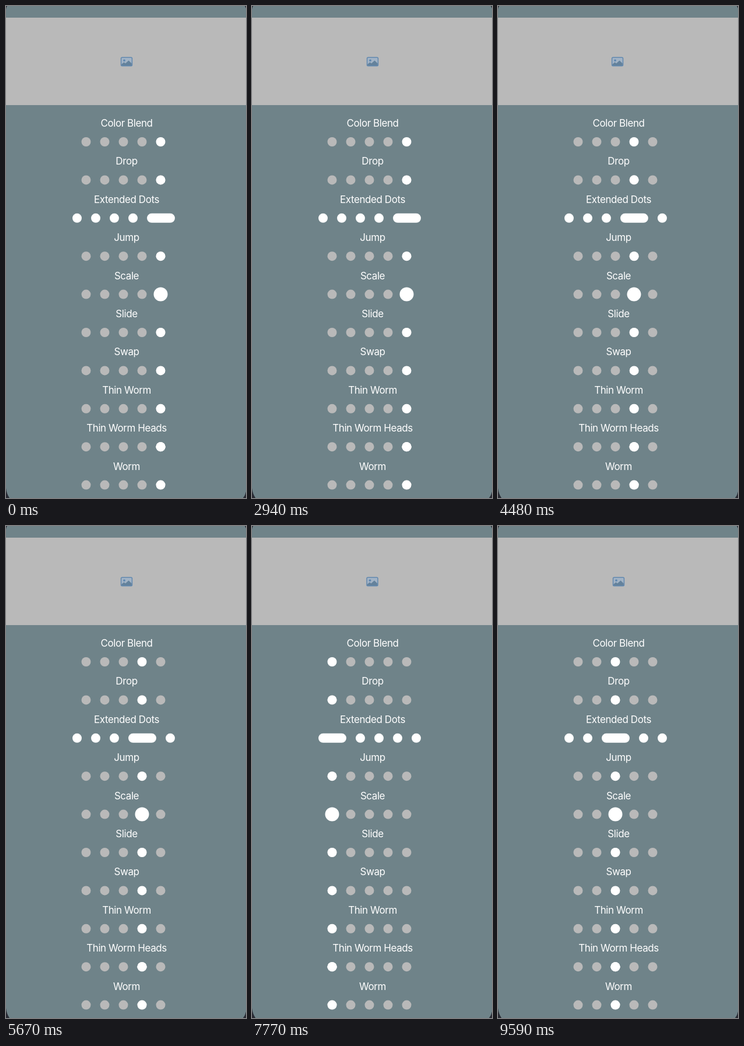
An HTML page with a canvas that plays this animation: 412x844 px, repeating every 9.66 s.

```html
<!DOCTYPE html>
<html lang="en">
<head>
<meta charset="utf-8">
<title>Page indicators</title>
<style>
html, body { margin: 0; width: 100%; height: 100%; overflow: hidden; background: #6f8389; }
canvas { display: block; }
</style>
</head>
<body>
<canvas id="stage" width="412" height="844"></canvas>
<script>
const ctx = document.getElementById('stage').getContext('2d');
const W = 412, H = 844, LOOP = 9660, STEP = 70, SWIPE = 500;
const BG = '#6f8389', GREY = '#b9b9b9', WHITE = '#fff', DARK = '#292b34';
const R = 8, GAP = 32, X0 = 137.5, Y0 = 233, ROW = 65.4;

// Swipes as [start time, direction], beginning on the last page
const swipes = [[4000, -1], [5760, -1], [6656, -1], [7220, -1], [7760, 1], [8304, 1]];

function pageAt(t) {
  return swipes.reduce((p, [start, dir]) => {
    const s = Math.min(1, Math.max(0, (t - start) / SWIPE));
    return p + dir * s * s * (3 - 2 * s);
  }, 4);
}

const dotX = i => X0 + GAP * i;
const near = (i, p) => Math.max(0, 1 - Math.abs(i - p));
const blend = k => {
  const v = Math.round(185 + 70 * k);
  return `rgb(${v},${v},${v})`;
};

function circle(x, y, r = R, color = WHITE) {
  ctx.fillStyle = color;
  ctx.beginPath();
  ctx.arc(x, y, r, 0, 7);
  ctx.fill();
}

function box(x, y, w, h, r, color = WHITE) {
  ctx.fillStyle = color;
  ctx.beginPath();
  ctx.roundRect(x, y, w, h, r);
  ctx.fill();
}

function shape(path, color) {
  ctx.fillStyle = color;
  ctx.fill(new Path2D(path));
}

function greyDots(y) {
  for (let i = 0; i < 5; i++) circle(dotX(i), y, R, GREY);
}

// Head and tail centres of a worm that stretches, then contracts
function wormEnds(p) {
  const i = Math.floor(p), f = p - i;
  return [dotX(i + Math.max(0, 2 * f - 1)), dotX(i + Math.min(1, 2 * f))];
}

function worm(p, y, h) {
  const [a, b] = wormEnds(p);
  box(a - R, y - h / 2, b - a + 2 * R, h, h / 2);
}

// Each drawer takes page p, row centre y and u, the distance to the nearest page
const rows = [
  ['Color Blend', (p, y) => {
    for (let i = 0; i < 5; i++) circle(dotX(i), y, R, blend(near(i, p)));
  }],
  ['Drop', (p, y, u) => {
    greyDots(y);
    ctx.save();
    ctx.beginPath();
    ctx.rect(0, y - 14.3, W, 29);
    ctx.clip();
    circle(dotX(p), y - 25 * u, R * (1 - u / 2));
    ctx.restore();
  }],
  ['Extended Dots', (p, y) => {
    let x = 114;
    for (let i = 0; i < 5; i++) {
      const w = 2 * R + GAP * near(i, p);
      box(x, y - R, w, 2 * R, R);
      x += w + 2 * R;
    }
  }],
  ['Jump', (p, y, u) => {
    greyDots(y);
    circle(dotX(p), y, R * (1 + 1.3 * u));
  }],
  ['Scale', (p, y) => {
    for (let i = 0; i < 5; i++) {
      const k = near(i, p);
      circle(dotX(i), y, R + 4 * k, blend(k));
    }
  }],
  ['Slide', (p, y) => {
    greyDots(y);
    circle(dotX(p), y);
  }],
  ['Swap', (p, y) => {
    const i = Math.floor(p), f = p - i;
    for (let j = 0; j < 5; j++) {
      if (j !== i) circle(dotX(j === i + 1 ? j - f : j), y, R, GREY);
    }
    circle(dotX(p), y);
  }],
  ['Thin Worm', (p, y, u) => {
    greyDots(y);
    worm(p, y, 2 * R * (1 - u));
  }],
  ['Thin Worm Heads', (p, y, u) => {
    greyDots(y);
    worm(p, y, 2 * R * (1 - u));
    wormEnds(p).forEach(x => circle(x, y));
  }],
  ['Worm', (p, y) => {
    greyDots(y);
    worm(p, y, 2 * R);
  }],
];

function icon(x) {
  ctx.save();
  ctx.translate(x, 95.5);
  box(-10.2, -8, 20.4, 16, 2.5, '#6188af');
  box(-8.7, -6.5, 17.4, 13, 1, '#a2b3c5');
  circle(-4, -2.2, 1.9, '#6188af');
  shape('M-8.7 4.5L-4.5 1L-2 3L3.5 -2L8.7 3V6.5H-8.7Z', '#64829c');
  ctx.restore();
}

function draw(now) {
  const t = Math.floor(now % LOOP / STEP) * STEP;
  const p = pageAt(t), u = Math.abs(p - Math.round(p));

  ctx.fillStyle = BG;
  ctx.fillRect(0, 0, W, H);
  ctx.fillStyle = GREY;
  ctx.fillRect(0, 20, W, 150);
  for (let i = 0; i < 5; i++) icon(207 + (i - p) * W);

  ctx.font = '17px Inter, sans-serif';
  ctx.letterSpacing = '-0.43px';
  ctx.textAlign = 'center';
  rows.forEach(([label, paint], i) => {
    ctx.fillStyle = WHITE;
    ctx.fillText(label, 207, 207 + ROW * i);
    paint(p, Y0 + ROW * i, u);
  });

  shape('M0 827Q1 837 6 844H0Z M412 833Q411 839 407 844H412Z M0 0H2Q0 3 0 6Z M410 0H412V4Z', DARK);
  requestAnimationFrame(draw);
}

const begin = performance.now();
const frame = draw;
draw = () => frame(performance.now() - begin);
draw();
</script>
</body>
</html>
```
